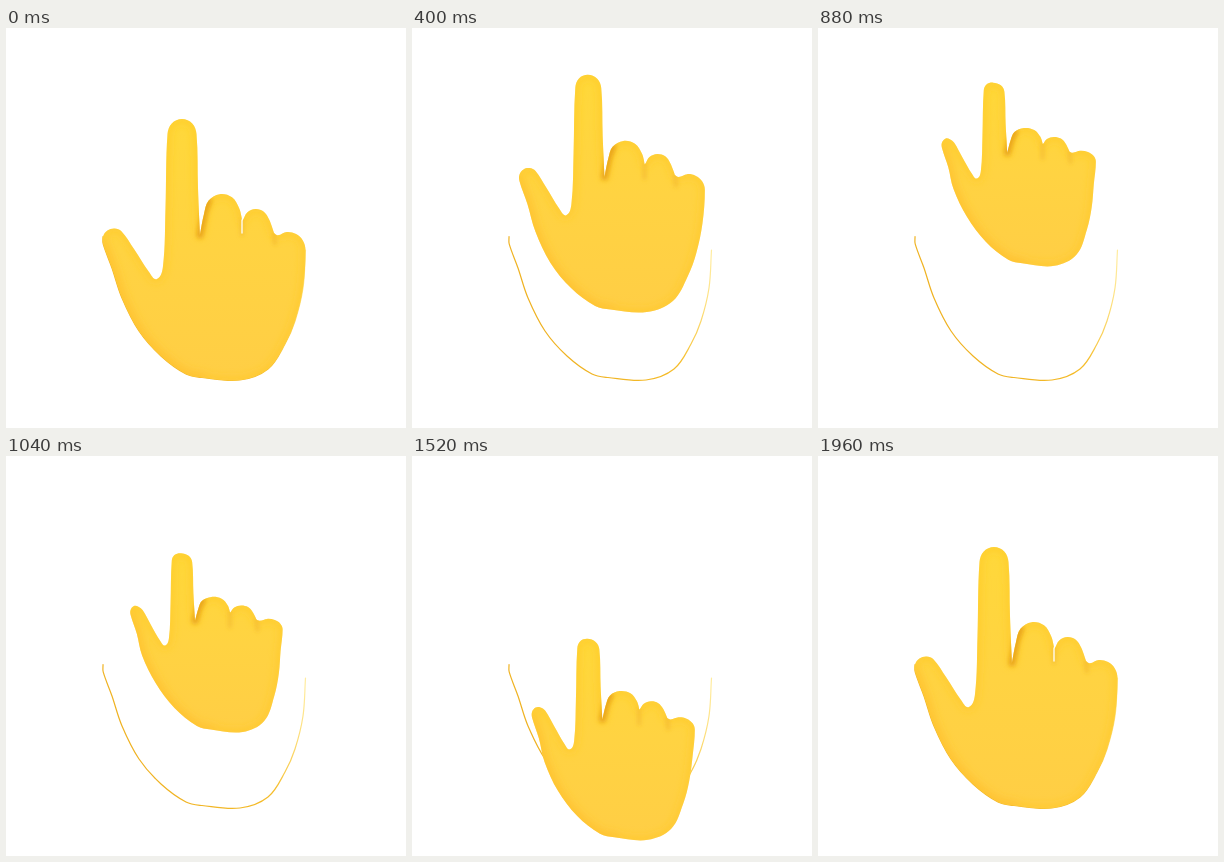
Recreate the animation shown at these times as an HTML page. Size 400x400 px, loop 2000 ms.

```html
<!DOCTYPE html>
<html lang="en">
<head>
<meta charset="utf-8">
<title>Pointing hand</title>
<style>
html, body { margin: 0; width: 100%; height: 100%; overflow: hidden; background: #fff; }
svg { display: block; width: 100vw; height: 100vh; }
path { fill: none; stroke-linecap: round; stroke-linejoin: round; }
</style>
</head>
<body>
<svg viewBox="0 0 400 400">
  <defs>
    <linearGradient id="skin" x1="0" y1="0" x2="0" y2="1">
      <stop offset="0" stop-color="#ffd83a"/>
      <stop offset=".5" stop-color="#ffd342"/>
      <stop offset="1" stop-color="#ffce45"/>
    </linearGradient>
    <linearGradient id="trace" gradientUnits="userSpaceOnUse" x1="130" y1="320" x2="300" y2="230">
      <stop offset="0" stop-color="#eeb01f"/>
      <stop offset=".6" stop-color="#f5bd2c"/>
      <stop offset="1" stop-color="#ffdf60" stop-opacity=".6"/>
    </linearGradient>
    <filter id="soft" filterUnits="userSpaceOnUse" x="0" y="0" width="400" height="400">
      <feGaussianBlur stdDeviation="4"/>
    </filter>
    <filter id="crisp" filterUnits="userSpaceOnUse" x="0" y="0" width="400" height="400">
      <feGaussianBlur stdDeviation="2"/>
    </filter>
    <clipPath id="inside"><path id="clip"/></clipPath>
  </defs>
  <path id="ghost" stroke="url(#trace)" stroke-width="1.2"/>
  <path id="hand" style="fill:url(#skin)"/>
  <g clip-path="url(#inside)">
    <g filter="url(#soft)">
      <path id="rim" stroke="#ffc726" stroke-width="6" opacity=".7"/>
      <path id="under" stroke="#ffbc2e" stroke-width="9" opacity=".6"/>
    </g>
    <g filter="url(#crisp)">
      <path id="shade" stroke="#e39a12" stroke-width="7" opacity=".75"/>
      <path id="creases" stroke="#f0b02a" stroke-width="3" opacity=".7"/>
    </g>
  </g>
  <path id="gap" stroke="#fff" stroke-width="1.3"/>
</svg>
<script>
const LOOP = 2000, STEP = 40, HEEL = 352;

// Time, height of the heel of the palm, tilt towards the viewer.
const keys = [
  [0, HEEL, 0],
  [400, 284, .29],
  [640, 209, .74],
  [1040, 276, 1],
  [1200, 358, .91],
  [1420, 387, .84],
  [1960, HEEL, 0],
];

// Rounded fingertip: an elliptic arc, angles in degrees.
function cap(x, y, rx, ry, from, to) {
  return Array.from({ length: 5 }, (_, i) => {
    const a = (from + (to - from) * i / 4) * Math.PI / 180;
    return [x + rx * Math.cos(a), y - ry * Math.sin(a)];
  });
}
const fold = (x, y) => [[x, y, true]];

// The open hand, clockwise from the thumb.
const rest = {
  thumb: cap(108, 212, 11.5, 11.5, 200, 50),
  web: [[128, 221], [143, 244], [151, 251], [157, 238], [159.5, 180]],
  index: cap(176, 106, 14.5, 15, 180, 0),
  indexSide: [[192, 160]],
  fold1: fold(194, 207),
  middle: cap(216, 186, 18, 20, 180, 15),
  fold2: fold(236, 192),
  ring: cap(250, 197, 14, 16, 165, 20),
  fold3: fold(268, 205),
  pinky: cap(282, 222, 17.5, 18, 125, 0),
  palm: [[297, 260], [289, 293], [279, 316], [262, 341], [234, HEEL], [196, 349.5],
    [180, 346], [155, 328], [133, 303], [116, 270], [106, 240]],
};

// Monotone cubic through one column of the keys, at rest on extremes and ends.
function track(col, t) {
  const last = keys.length - 1;
  if (t >= keys[last][0]) return keys[last][col];
  const i = keys.findIndex((_, k) => t < keys[k + 1][0]);
  const slope = k => (keys[k + 1][col] - keys[k][col]) / (keys[k + 1][0] - keys[k][0]);
  const tangent = k => {
    if (k === 0 || k === last) return 0;
    const a = slope(k - 1), b = slope(k);
    return a * b <= 0 ? 0 : 2 * a * b / (a + b);
  };
  const h = keys[i + 1][0] - keys[i][0], u = (t - keys[i][0]) / h, v = 1 - u;
  return keys[i][col] * v * v * (1 + 2 * u) + keys[i + 1][col] * u * u * (1 + 2 * v)
    + h * u * v * (tangent(i) * v - tangent(i + 1) * u);
}

const clamp = v => Math.min(1, Math.max(0, v));

// Tilting foreshortens the fingers, narrows the palm and folds the thumb in.
function warp([x, y, sharp], heel, tilt) {
  const up = HEEL - y, h = clamp(up / 90);
  const thumb = clamp((180 - x) / 80);
  const pivot = 250 - 85 * h;
  const bend = 16 * Math.sin(tilt * Math.PI / 2) * thumb * clamp(up / 100);
  const drop = .42 * Math.max(0, up - 65) * (1 - .35 * thumb * thumb);
  return [x + tilt * .17 * (pivot - x) + bend, heel - up + tilt * drop, sharp];
}

const fmt = p => p.slice(0, 2).map(v => v.toFixed(2)).join(' ');

// Smooth path whose tangents follow the neighbours; folds stay sharp.
function curve(pts, closed) {
  const n = pts.length;
  const at = i => closed ? pts[(i + n) % n] : pts[Math.max(0, Math.min(n - 1, i))];
  const dir = i => {
    if (at(i)[2]) return [0, 0];
    const a = at(i - 1), b = at(i + 1), len = Math.hypot(b[0] - a[0], b[1] - a[1]);
    return [(b[0] - a[0]) / len, (b[1] - a[1]) / len];
  };
  let d = 'M' + fmt(pts[0]);
  for (let i = 0; i < (closed ? n : n - 1); i++) {
    const p = at(i), q = at(i + 1), from = dir(i), to = dir(i + 1);
    const h = Math.hypot(q[0] - p[0], q[1] - p[1]) / 2.9;
    const c1 = from.map((v, k) => p[k] + v * h);
    const c2 = to.map((v, k) => q[k] - v * h);
    d += `C${fmt(c1)} ${fmt(c2)} ${fmt(q)}`;
  }
  return d;
}

const el = id => document.getElementById(id);
const set = (id, d) => el(id).setAttribute('d', d);
const line = (p, dx, dy) => `M${fmt(p)}l${dx} ${dy}`;

set('ghost', curve([rest.pinky[4], ...rest.palm, ...rest.thumb.slice(0, 2)]));

function draw(t) {
  const heel = track(1, t), tilt = track(2, t), hand = {};
  for (const part in rest) hand[part] = rest[part].map(p => warp(p, heel, tilt));
  const outline = curve(Object.values(hand).flat(), true) + 'Z';
  for (const id of ['hand', 'clip', 'rim']) set(id, outline);
  set('under', curve([...hand.palm.slice(5), hand.thumb[0]]));
  const [left, upper] = hand.middle;
  set('shade', `M${fmt(hand.fold1[0])}L${fmt(left)}L${fmt(upper)}`);
  set('creases', line(hand.fold2[0], 0, 15) + line(hand.fold3[0], 1, 11));
  set('gap', line(hand.fold2[0], 0, 13));
  el('gap').setAttribute('opacity', clamp(1 - 8 * tilt));
}

let start;
function tick(now) {
  start ??= now;
  const t = (now - start) % LOOP;
  draw(Math.floor(t / STEP) * STEP);
  requestAnimationFrame(tick);
}
draw(0);
requestAnimationFrame(tick);
</script>
</body>
</html>
```
